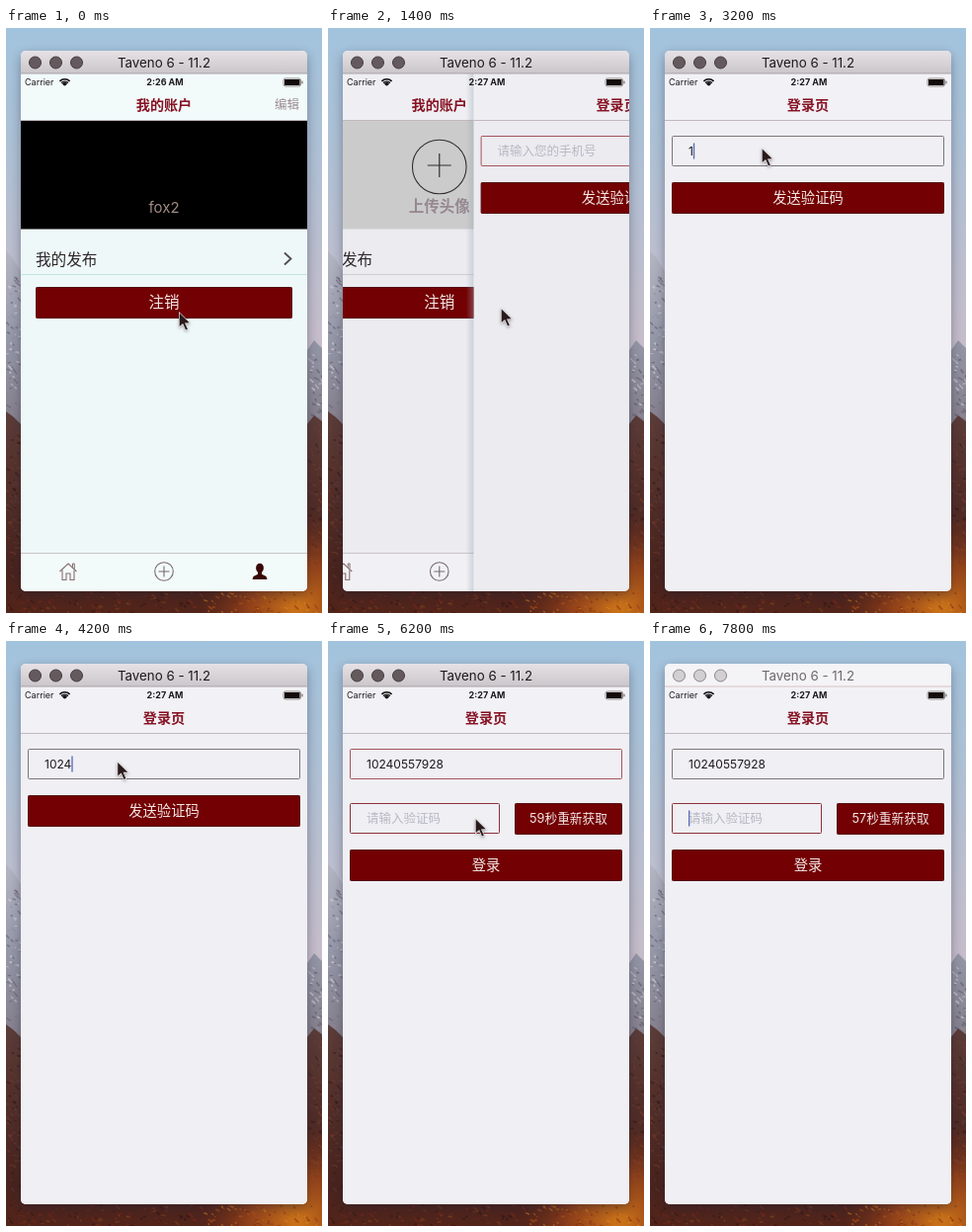
An HTML page with a canvas for the animation above (8 s loop, 320x592 px).

```html
<!DOCTYPE html>
<html lang="zh-CN">
<head>
<meta charset="utf-8">
<title>登录页</title>
<style>
html, body { margin: 0; width: 100%; height: 100%; overflow: hidden; background: #9cc3dc; }
canvas { display: block; width: 320px; height: 592px; }
</style>
</head>
<body>
<canvas id="stage"></canvas>
<script>
const W = 320, H = 592, LOOP = 8000, STEP = 200;
const WIN = { x: 15, y: 23, w: 290, h: 547 };
const FONT = 'Inter, "Noto Sans CJK SC", "Noto Sans CJK", sans-serif';
const RED = '#730002', TITLE = '#861223', INK = '#2c2628';
const PHONE = '10240557928';

// moments of the story, in ms
const LOGOUT = 1200, PUSH = 1315, PUSH_TIME = 500, FOCUS = 2200, TYPE = 3200;
const SEND = 5800, CODE_FOCUS = 6400, LEAVE = 7600;

const canvas = document.getElementById('stage');
const ctx = canvas.getContext('2d');
const dpr = window.devicePixelRatio || 1;
canvas.width = W * dpr;
canvas.height = H * dpr;

// time, x, y of the pointer tip
const POINTER = [
  [0, 175, 287], [600, 175, 284], [1400, 175, 283], [2000, 114, 122],
  [3200, 113, 121], [5300, 112, 122], [5800, 149, 179], [6900, 149, 179],
  [7500, 335, 230]
];

const clamp = v => Math.max(0, Math.min(1, v));
const smooth = u => u * u * (3 - 2 * u);
const blinkOn = age => age >= 0 && age % 1000 < 600;

function rect(x, y, w, h, fill) {
  ctx.fillStyle = fill;
  ctx.fillRect(x, y, w, h);
}

function frame(x, y, w, h, color) {
  rounded(x, y, w, h, 1);
  ctx.strokeStyle = color;
  ctx.lineWidth = 1;
  ctx.stroke();
}

function rounded(x, y, w, h, r) {
  ctx.beginPath();
  ctx.moveTo(x + r, y);
  ctx.arcTo(x + w, y, x + w, y + h, r);
  ctx.arcTo(x + w, y + h, x, y + h, r);
  ctx.arcTo(x, y + h, x, y, r);
  ctx.arcTo(x, y, x + w, y, r);
  ctx.closePath();
}

function poly(points, fill) {
  ctx.beginPath();
  points.forEach(([x, y]) => ctx.lineTo(x, y));
  ctx.closePath();
  ctx.fillStyle = fill;
  ctx.fill();
}

function line(points, color, width = 1) {
  ctx.beginPath();
  points.forEach(([x, y], i) => i ? ctx.lineTo(x, y) : ctx.moveTo(x, y));
  ctx.strokeStyle = color;
  ctx.lineWidth = width;
  ctx.stroke();
}

function circle(x, y, r, fill, stroke, width = 1) {
  ctx.beginPath();
  ctx.arc(x, y, r, 0, Math.PI * 2);
  if (fill) { ctx.fillStyle = fill; ctx.fill(); }
  if (stroke) { ctx.strokeStyle = stroke; ctx.lineWidth = width; ctx.stroke(); }
}

// y is the vertical middle of the glyphs
function text(str, x, y, size, color, align = 'center', weight = 400) {
  ctx.font = `${weight} ${size}px ${FONT}`;
  ctx.textAlign = align;
  ctx.textBaseline = 'alphabetic';
  ctx.fillStyle = color;
  ctx.fillText(str, x, y + size * 0.37);
}

function gradient(y0, y1, ...stops) {
  const g = ctx.createLinearGradient(0, y0, 0, y1);
  stops.forEach(([at, color]) => g.addColorStop(at, color));
  return g;
}

function randomizer(seed) {
  return () => (seed = (seed * 16807) % 2147483647) / 2147483647;
}

// short slanted strokes scattered over a box
function texture(rnd, count, x, y, w, h, colors) {
  for (let i = 0; i < count; i++) {
    const px = x + rnd() * w, py = y + rnd() * h, len = 2 + rnd() * 5;
    const color = colors[Math.floor(rnd() * colors.length)];
    line([[px, py], [px + len * 0.6, py + len * (rnd() - 0.2)]], color, 1 + rnd());
  }
}

function drawDesktop() {
  rect(0, 0, W, H, gradient(0, 340, [0, '#a2c3dd'], [0.3, '#abc1d6'], [1, '#c9bcc8']));
  poly([[0, 226], [6, 232], [15, 246], [160, 300], [305, 326], [312, 316], [320, 324], [320, H], [0, H]],
    gradient(230, 400, [0, '#b3b4c2'], [0.5, '#9497a7'], [1, '#857f8c']));
  poly([[0, 388], [8, 394], [16, 402], [160, 430], [304, 402], [312, 392], [320, 398], [320, H], [0, H]],
    gradient(390, H, [0, '#5b3c38'], [0.3, '#54302a'], [0.8, '#48221c'], [1, '#52241a']));

  const rnd = randomizer(71);
  const snow = ['rgba(214,212,222,.6)', 'rgba(84,80,98,.5)', 'rgba(150,140,155,.5)'];
  const brush = ['rgba(122,62,46,.55)', 'rgba(42,20,20,.5)', 'rgba(96,66,62,.5)'];
  texture(rnd, 70, 0, 250, 14, 140, snow);
  texture(rnd, 45, 305, 330, 15, 65, snow);
  texture(rnd, 70, 0, 402, 14, 168, brush);
  texture(rnd, 70, 305, 402, 15, 145, brush);

  const glow = ctx.createRadialGradient(295, 588, 5, 295, 588, 100);
  glow.addColorStop(0, 'rgba(206,116,24,.95)');
  glow.addColorStop(0.45, 'rgba(170,76,24,.75)');
  glow.addColorStop(1, 'rgba(120,45,22,0)');
  rect(190, 480, 130, 112, glow);
  texture(rnd, 90, 0, 571, 200, 21, ['rgba(130,42,26,.5)', 'rgba(40,16,16,.45)', 'rgba(150,78,30,.4)']);
  texture(rnd, 70, 200, 571, 120, 21, ['rgba(222,142,34,.5)', 'rgba(120,40,18,.5)', 'rgba(190,92,24,.5)']);
}

function drawTitleBar(active) {
  rect(15, 23, 290, 23, active
    ? gradient(23, 46, [0, '#e6e1e5'], [1, '#cbc6ca'])
    : '#f4f3f5');
  rect(15, 45.5, 290, 1, active ? '#aaa3a7' : '#d8c4c4');
  for (const x of [29.5, 50.5, 71.5]) {
    circle(x, 35, 6, active ? '#645a5d' : '#d2d0d3', active ? '#453b3e' : '#8b8689');
  }
  text('Taveno 6 - 11.2', 160, 35.5, 13.3, active ? '#1d191b' : '#6d686b');
}

function drawStatus(clock) {
  text('Carrier', 19, 55, 9, '#1d191b', 'left');
  text(clock, 161, 55, 9, '#1d191b', 'center', 700);
  for (const r of [2.2, 4.8, 7.2]) {
    ctx.beginPath();
    ctx.arc(59.5, 59, r, -Math.PI * 0.75, -Math.PI * 0.25);
    ctx.strokeStyle = '#141012';
    ctx.lineWidth = r < 3 ? 3 : 1.6;
    ctx.stroke();
  }
  rounded(281, 51, 17.5, 8, 2);
  ctx.strokeStyle = '#77706f';
  ctx.lineWidth = 0.8;
  ctx.stroke();
  rect(282, 52, 15.5, 6, '#140a0a');
  rect(299.4, 53.6, 1.2, 2.8, '#77706f');
}

function drawPage(bg, title) {
  rect(15, 46, 290, 524, bg);
  rect(15, 46, 290, 47, 'rgba(255,255,255,.2)');
  rect(15, 93, 290, 1, '#c3b8bf');
  text(title, 160, 77.5, 14.1, TITLE, 'center', 700);
}

function button(label, x, y, w, size, edge = '#541013') {
  rect(x + 0.5, y + 0.5, w - 1, 31, RED);
  frame(x + 0.5, y + 0.5, w - 1, 31, edge);
  text(label, x + w / 2, y + 15.5, size, '#f3e6e6');
}

function drawTabs() {
  rect(15, 531, 290, 39, 'rgba(255,255,255,.3)');
  rect(15, 531, 290, 1, '#c9c3c6');
  const ink = '#876f70';
  line([[54.5, 550], [63, 542], [71.5, 550]], ink, 1.1);
  line([[57, 548.5], [57, 558.5], [61, 558.5], [61, 552], [65, 552], [65, 558.5], [69, 558.5], [69, 548.5]], ink, 1.1);
  line([[67.5, 545.5], [67.5, 542], [69.3, 542], [69.3, 547]], ink);
  circle(160, 550, 9.3, null, '#776b6e', 1.1);
  line([[154.5, 550], [165.5, 550]], '#776b6e', 1.1);
  line([[160, 544.5], [160, 555.5]], '#776b6e', 1.1);
  ctx.fillStyle = '#3a0808';
  ctx.beginPath();
  ctx.ellipse(257, 546.5, 3.9, 4.8, 0, 0, Math.PI * 2);
  ctx.fill();
  rect(255, 549, 4, 5, '#3a0808');
  poly([[249.5, 558], [250.5, 555], [255, 552.8], [259, 552.8], [263.5, 555], [264.5, 558]], '#3a0808');
}

function drawAccount(bg, signedIn) {
  drawPage(bg, '我的账户');
  text('编辑', 284.5, 77.5, 12.5, '#9b8d93');
  if (signedIn) {
    rect(15, 94, 290, 109.5, '#000');
    text('fox2', 160, 181, 15, '#a18b85');
  } else {
    rect(15, 94, 290, 109.5, '#cbcbcc');
    circle(160, 140.5, 27.3, null, '#322d2f', 1.1);
    line([[148, 139], [172, 139]], '#322d2f', 1.2);
    line([[160, 127], [160, 151]], '#322d2f', 1.2);
    text('上传头像', 160, 180.5, 15.5, '#968890', 'center', 700);
  }
  text('我的发布', 30, 234.5, 15.6, INK, 'left');
  line([[282, 227.5], [288.5, 233.5], [282, 239.5]], '#514b4e', 1.8);
  rect(15, 249, 290, 1, signedIn ? '#c2e4e4' : '#cfcdd4');
  button('注销', 30, 262, 260, 15.6);
  drawTabs();
}

function drawField(x, y, w, value, hint, edge, caret) {
  frame(x + 0.5, y + 0.5, w - 1, 30, edge);
  const mid = y + 15.5;
  if (value) text(value, 39, mid, 12, '#1c181b', 'left');
  else text(hint, 39, mid, 12.5, '#b9b8c4', 'left');
  if (caret) rect(39 + (value ? ctx.measureText(value).width : 0), mid - 8, 1.3, 16, '#5866b4');
}

function digitCount(t) {
  if (t < TYPE) return 0;
  const n = t <= 5200 ? 1 + (t - TYPE) / 285 : 8 + (t - 5200) / 133;
  return Math.min(PHONE.length, Math.floor(n));
}

function drawLogin(bg, t) {
  drawPage(bg, '登录页');
  const sent = t >= SEND;
  const caret = t < TYPE ? blinkOn(t - FOCUS) : !sent;
  const editing = t >= FOCUS && !sent;
  const idle = t < FOCUS || t < CODE_FOCUS && sent;
  drawField(22, 109, 276, PHONE.slice(0, digitCount(t)), '请输入您的手机号',
    idle ? '#a5545b' : '#7d7579', editing && caret);
  if (!sent) {
    button('发送验证码', 22, 156, 276, 14.3);
    return;
  }
  drawField(22, 164, 152, '', '请输入验证码', '#8a2f37', blinkOn(t - CODE_FOCUS));
  const left = 59 - Math.floor((t - SEND) / 1000);
  button(left + '秒重新获取', 189, 164, 109, 12.7);
  button('登录', 22, 211, 276, 14.3);
}

function drawScreens(t) {
  const push = 1 - Math.pow(1 - clamp((t - PUSH) / PUSH_TIME), 4.2);
  const signedIn = t < LOGOUT;
  const bg = signedIn ? '#eef8f8' : push < 1 ? '#ebebf0' : '#efeff4';
  const inset = WIN.w * (1 - push);
  if (push < 1) shifted(-0.3 * WIN.w * push, () => drawAccount(bg, signedIn));
  if (push > 0) {
    if (push < 1) {
      const g = ctx.createLinearGradient(inset + 7, 0, inset + 15, 0);
      g.addColorStop(0, 'rgba(150,165,175,0)');
      g.addColorStop(1, 'rgba(150,165,175,.4)');
      rect(inset + 7, 46, 8, 524, g);
    }
    shifted(inset, () => drawLogin(bg, t));
  }
}

function shifted(dx, draw) {
  ctx.save();
  ctx.translate(dx, 0);
  draw();
  ctx.restore();
}

function drawPointer(t) {
  const i = POINTER.findIndex(p => p[0] > t);
  if (i < 0) return;
  const a = POINTER[i - 1], b = POINTER[i];
  const u = smooth((t - a[0]) / (b[0] - a[0]));
  ctx.save();
  ctx.translate(a[1] + (b[1] - a[1]) * u, a[2] + (b[2] - a[2]) * u);
  ctx.scale(1.15, 1.15);
  ctx.shadowColor = 'rgba(0,0,0,.35)';
  ctx.shadowBlur = 3 * dpr;
  ctx.shadowOffsetY = dpr;
  poly([[0, 0], [0, 14.5], [3.4, 11.5], [5.8, 17], [8.5, 15.8], [6.1, 10.6], [10.6, 10.4]], '#e9e4e6');
  ctx.shadowColor = 'transparent';
  poly([[0.6, 1.3], [0.6, 13], [3.6, 10.4], [6.1, 16.1], [7.7, 15.4], [5.2, 9.9], [9.3, 9.8]], '#2a1a1c');
  ctx.restore();
}

function draw(t) {
  ctx.setTransform(dpr, 0, 0, dpr, 0, 0);
  drawDesktop();
  ctx.save();
  ctx.shadowColor = 'rgba(30,30,50,.38)';
  ctx.shadowBlur = 12 * dpr;
  ctx.shadowOffsetY = 4 * dpr;
  rounded(WIN.x, WIN.y, WIN.w, WIN.h, 5);
  ctx.fillStyle = '#efeff4';
  ctx.fill();
  ctx.restore();

  ctx.save();
  rounded(WIN.x, WIN.y, WIN.w, WIN.h, 5);
  ctx.clip();
  drawScreens(t);
  drawTitleBar(t < LEAVE);
  drawStatus(t < 800 ? '2:26 AM' : '2:27 AM');
  ctx.restore();
  drawPointer(t);
}

const start = performance.now();
function tick() {
  const t = (performance.now() - start) % LOOP;
  draw(Math.floor(t / STEP) * STEP);
  requestAnimationFrame(tick);
}
tick();
</script>
</body>
</html>
```
